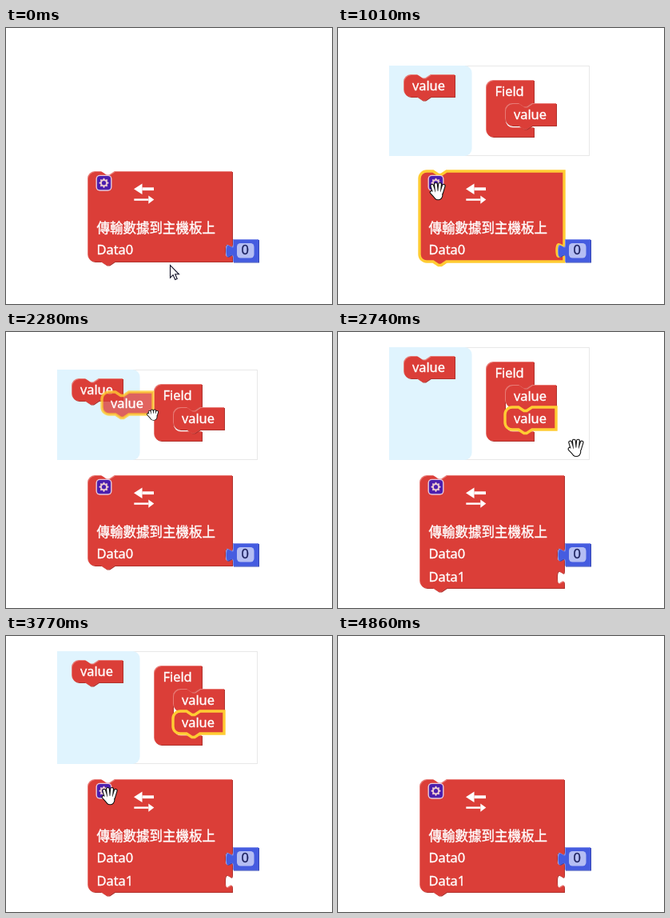
These frames come from a looping animation (408x345 px, 4940 ms). An HTML page with a canvas:

```html
<!DOCTYPE html>
<html lang="zh-Hant">
<head>
<meta charset="utf-8">
<style>
html, body { margin: 0; width: 408px; height: 345px; overflow: hidden; background: #fff; }
canvas { display: block; }
</style>
</head>
<body>
<canvas id="stage" width="408" height="345"></canvas>
<script>
const ctx = document.getElementById('stage').getContext('2d');
const LOOP = 4940, TICKS = 63, TICK = LOOP / TICKS;
const RED = { fill: '#db3e38', light: '#e87a75', dark: '#b0322d' };
const BLUE = { fill: '#455ce0', light: '#7d8dea', dark: '#3748b4' };
const PURPLE = '#4c1fae', GLOW = '#fc3';
const FONT = '16.5px "Open Sans", "Noto Sans", "Noto Sans CJK TC", "Noto Sans CJK", sans-serif';

// Moments of the story, in ticks
const PRESS = 8, OPEN = 9, GRAB = 25, DRAG = 27, DROP = 34, CLOSE = 51, DESELECT = 56, LEAVE = 62;

// Mouse stops: [tick, x, y]
const ROUTE = [[0, 205, 296], [7, 127, 208], [15, 123, 200], [19, 136, 98], [22, 141, 91],
  [GRAB, 146, 84], [26, 146, 84], [29, 184, 101], [33, 275, 147], [38, 331, 139], [41, 335, 139],
  [47, 136, 202], [49, 123, 196], [CLOSE, 123, 196], [52, 170, 197], [57, 339, 183],
  [58, 339, 183], [61, 366, 304], [LEAVE, 366, 304]];

// Block outlines
const NOTCH = 'l6.7 4.5h3.4l6.7-4.5';
const NOTCH_BACK = 'l-6.7 4.5h-3.4l-6.7-4.5';
const TOP_LEFT = 'M0 9a9 9 0 0 1 9-9';
const BOTTOM_LEFT = 'H9a9 9 0 0 1-9-9z';
const SOCKET = 'c0 11.2-9-9-9 8.4s9-2.8 9 8.4';
const PLUG = 'c0-11.2-9 9-9-8.4s9 2.8 9-8.4';

function mainPath(rows) {
  let d = TOP_LEFT + 'h8' + NOTCH + 'H181';
  for (let i = 0; i < rows; i++) d += 'V' + (90.6 + i * 28.5) + SOCKET;
  return new Path2D(d + 'V' + (85 + rows * 28) + 'H33.8' + NOTCH_BACK + BOTTOM_LEFT);
}

function fieldPath(slots) {
  return new Path2D(TOP_LEFT + 'H60V29H57' + NOTCH_BACK + 'H33a9 9 0 0 0-9 9v' + (slots * 28 - 16) +
    'a9 9 0 0 0 9 9H60v12' + BOTTOM_LEFT);
}

const VALUE = new Path2D(TOP_LEFT + 'h8' + NOTCH + 'H64V28H33.8' + NOTCH_BACK + BOTTOM_LEFT);
const NUMBER = new Path2D('M0 0H32V28.5H0V22.8' + PLUG + 'z');

function fillAt(path, offset, color) {
  ctx.save();
  ctx.translate(offset, offset);
  ctx.fillStyle = color;
  ctx.fill(path);
  ctx.restore();
}

function block(path, x, y, tone, glow, ghost) {
  ctx.save();
  ctx.translate(x, y);
  if (ghost) {
    ctx.globalAlpha = 0.8;
    fillAt(path, 0, tone.fill);
  } else {
    fillAt(path, 1, tone.dark);
    fillAt(path, 0, tone.light);
    ctx.save();
    ctx.clip(path);
    fillAt(path, 1, tone.fill);
    ctx.restore();
  }
  if (glow) {
    ctx.strokeStyle = GLOW;
    ctx.lineWidth = 3.4;
    ctx.stroke(path);
  }
  ctx.restore();
}

function label(text, x, y, color = '#fff') {
  ctx.font = FONT;
  ctx.fillStyle = ctx.strokeStyle = color;
  ctx.lineWidth = 0.4;
  ctx.fillText(text, x, y);
  ctx.strokeText(text, x, y);
}

function valueBlock(x, y, glow, ghost) {
  block(VALUE, x, y, RED, glow, ghost);
  label('value', x + 11, y + 20);
}

function panel(x, y, w, h, radius, color) {
  ctx.beginPath();
  ctx.roundRect(x, y, w, h, radius);
  ctx.fillStyle = color;
  ctx.fill();
}

function disc(x, y, r, color) {
  ctx.beginPath();
  ctx.arc(x, y, r, 0, 7);
  ctx.fillStyle = color;
  ctx.fill();
}

function gear(x, y) {
  panel(x - 10, y - 10, 20, 20, 5, '#e6c8dc');
  panel(x - 8.6, y - 8.6, 17.2, 17.2, 3.6, PURPLE);
  ctx.beginPath();
  for (let i = 0; i < 32; i++) {
    const r = i % 4 < 2 ? 6 : 4.6, a = (i - 0.5) * Math.PI / 16;
    ctx.lineTo(x + r * Math.cos(a), y + r * Math.sin(a));
  }
  ctx.fillStyle = '#ecc9cf';
  ctx.fill();
  disc(x, y, 2.6, PURPLE);
}

// Straight arrow; dir is 1 when it points right
function sign(tip, y, dir, head, spread, shaft) {
  const neck = tip - dir * head;
  ctx.fillStyle = '#fff';
  ctx.beginPath();
  ctx.moveTo(tip, y);
  ctx.lineTo(neck, y - spread);
  ctx.lineTo(neck, y + spread);
  ctx.fill();
  ctx.fillRect(neck, y - shaft, dir * (head - 25), 2 * shaft);
}

function mainBlock(rows, glow) {
  block(mainPath(rows), 102, 179, RED, glow);
  gear(122.5, 193.7);
  sign(160, 201.2, -1, 10.5, 6.8, 1.9);
  sign(185.3, 214.6, 1, 7, 5.2, 1.2);
  label('傳輸數據到主機板上', 113.5, 255.5);
  for (let i = 0; i < rows; i++) label('Data' + i, 113.5, 283 + i * 28.7);
  block(NUMBER, 284, 264, BLUE);
  panel(289, 269, 21.5, 18.5, 4.5, '#b5bef3');
  label('0', 294.5, 283.3, '#1a1f5c');
}

function popup(slots, picked) {
  const top = 75 - slots * 28, height = 160 - top;
  panel(64, top, 251, height, 0, '#e8e8e8');
  panel(65, top + 1, 249, height - 2, 0, '#fff');
  panel(64, top, 103.5, height, [0, 9, 9, 0], '#e0f4fe');
  valueBlock(82, top + 11, picked);
  block(fieldPath(slots), 185, top + 18, RED);
  label('Field', 196.5, top + 37.6);
  for (let i = 0; i < slots; i++) valueBlock(209, top + 47 + i * 28, i > 0);
}

// Four fanned fingers, a thumb and a palm; reach is the finger length
function hand(x, y, reach, size) {
  ctx.save();
  ctx.translate(x, y);
  ctx.scale(size, size);
  ctx.lineCap = 'round';
  for (const [color, edge] of [['#111', 2.2], ['#fff', 0]]) {
    ctx.strokeStyle = ctx.fillStyle = color;
    ctx.lineWidth = 2.7 + edge;
    ctx.beginPath();
    for (let i = -1.5; i < 2; i++) {
      const a = i * 0.2, length = reach - Math.abs(i) * 1.6;
      ctx.moveTo(i * 3 + 0.5, 3);
      ctx.lineTo(i * 3 + 0.5 + length * Math.sin(a), 3 - length * Math.cos(a));
    }
    ctx.moveTo(-7.4, 2.4);
    ctx.lineTo(-3, 7);
    ctx.stroke();
    ctx.beginPath();
    ctx.ellipse(0.8, 6, 5 + edge / 2, 5.2 + edge / 2, 0, 0, 7);
    ctx.fill();
  }
  ctx.restore();
}

function arrow(x, y) {
  const shape = new Path2D('M0 0V15.6L3.6 12.2 6.2 18 8.7 17 6.2 11.3H11z');
  ctx.save();
  ctx.translate(x + 0.5, y + 0.5);
  ctx.fillStyle = '#fff';
  ctx.fill(shape);
  ctx.strokeStyle = '#16162c';
  ctx.lineWidth = 1.1;
  ctx.stroke(shape);
  ctx.restore();
}

function locate(n) {
  const i = Math.max(1, ROUTE.findIndex(stop => stop[0] >= n));
  const [n0, x0, y0] = ROUTE[i - 1], [n1, x1, y1] = ROUTE[i];
  const p = (n - n0) / (n1 - n0);
  return [x0 + (x1 - x0) * p, y0 + (y1 - y0) * p];
}

function cursor(n, x, y) {
  const overBlock = x < 283 && y > 179 && y < 293;
  const overValue = n > 22 && n < 36;
  if (n >= GRAB && n < DROP) hand(x, y, 7, 0.8);
  else if (overBlock || overValue) hand(x, y, 11.5, 1);
  else arrow(x, y);
}

function draw(n) {
  const [x, y] = locate(n);
  const slots = n < DROP ? 1 : 2;
  ctx.fillStyle = '#fff';
  ctx.fillRect(0, 0, 408, 345);
  mainBlock(slots, n >= PRESS && n < DRAG || n >= CLOSE && n < DESELECT);
  if (n >= OPEN && n < CLOSE) popup(slots, n >= GRAB && n < DRAG);
  if (n >= DRAG && n < DROP) valueBlock(x - 64, y - 26, true, true);
  if (n < LEAVE) cursor(n, x, y);
}

const start = performance.now();

function loop() {
  const t = performance.now() - start;
  draw(Math.floor((t + 5) / TICK) % TICKS);
  requestAnimationFrame(loop);
}
loop();
</script>
</body>
</html>
```
